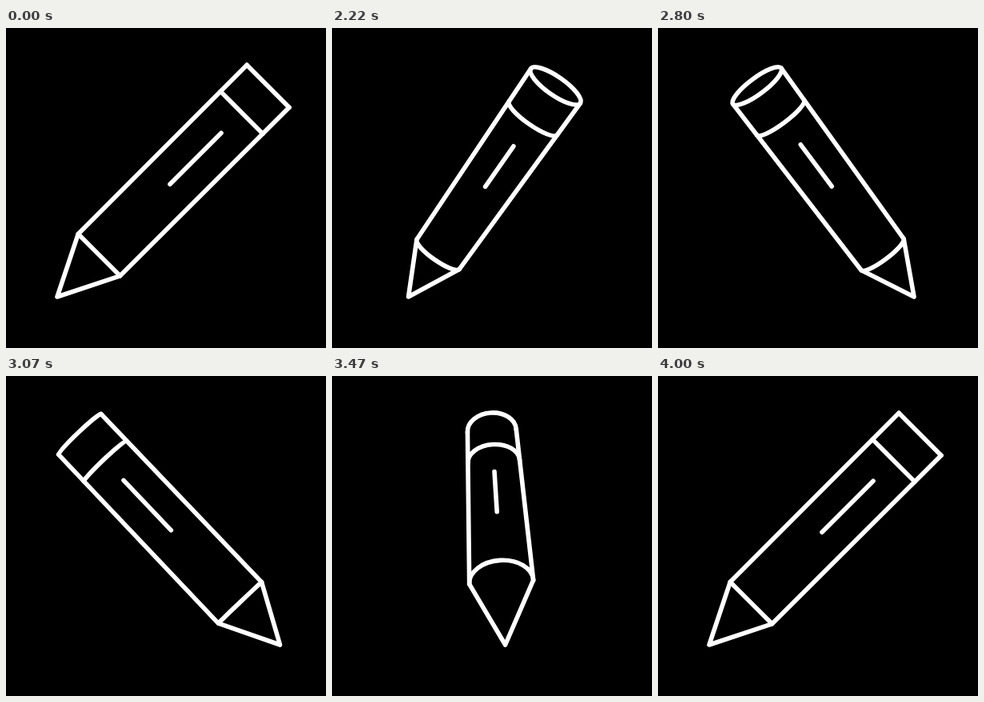
These frames come from a looping animation (400x400 px, 4020 ms). An HTML page with a canvas:

```html
<!DOCTYPE html>
<html>
<head>
<meta charset="utf-8">
<style>
html, body { margin: 0; width: 100%; height: 100%; overflow: hidden; background: #000; }
canvas { display: block; }
</style>
</head>
<body>
<canvas id="stage" width="400" height="400"></canvas>
<script>
const LOOP = 4020, REST = 2000, TURN = 2000;
const ctx = document.getElementById('stage').getContext('2d');

function draw(ms) {
  const moving = ms >= REST && ms < REST + TURN;
  const angle = moving ? (ms - REST) / TURN * 2 * Math.PI : 0;
  const cos = Math.cos(angle);
  const front = Math.sin(angle) >= 0; // eraser end faces the viewer
  const depth = Math.abs(Math.sin(angle)) ** 1.5;
  const late = depth ** 4;
  // value in the flat pose, plus its change when fully facing or turned away
  const mix = (flat, toward, away, amount = depth) => flat + (front ? toward : away) * amount;

  const tip = { x: 205 - cos * mix(141, 21, -14, late), y: 336 };
  const top = { x: 205 + cos * mix(122.5, -50, -66), y: mix(72.8, -5.2, -4.6, late) };
  const tilt = Math.atan2(top.y - tip.y, top.x - tip.x) + Math.PI / 2;
  const along = f => ({ x: tip.x + (top.x - tip.x) * f, y: tip.y + (top.y - tip.y) * f });

  const baseAt = mix(0.199, 0.01, 0.095, depth ** 2), bandAt = mix(0.875, -0.055, -0.02);
  const baseR = mix(37, -8.8, 3.1), topR = mix(37.4, 0.5, -7);
  const bandR = baseR + (topR - baseR) * (bandAt - baseAt) / (1 - baseAt);
  const ring = (at, r, toward, away) => ({ ...along(at), r, bulge: r * mix(0, toward, away) });
  const base = ring(baseAt, baseR, 0.48, 0.69 * depth);
  const band = ring(bandAt, bandR, 0.47, 0.67);
  const cap = ring(1, topR, 0.6, 0.74);

  const edge = (c, side) => [c.x + side * c.r * Math.cos(tilt), c.y + side * c.r * Math.sin(tilt)];
  const line = (...points) => {
    ctx.beginPath();
    points.forEach(p => ctx.lineTo(...p));
    ctx.stroke();
  };
  const arc = (c, whole) => {
    const start = front ? 0 : Math.PI;
    ctx.beginPath();
    ctx.ellipse(c.x, c.y, c.r, Math.max(c.bulge, 0.01), tilt, start, start + Math.PI * (whole ? 2 : 1));
    ctx.stroke();
  };

  ctx.fillStyle = '#000';
  ctx.fillRect(0, 0, 400, 400);
  ctx.strokeStyle = '#fff';
  ctx.lineWidth = 5.6;
  ctx.lineCap = ctx.lineJoin = 'round';

  line(edge(cap, -1), edge(base, -1), [tip.x, tip.y], edge(base, 1), edge(cap, 1));
  arc(base);
  arc(band);
  arc(cap, front);

  const from = along(mix(0.535, -0.025, 0.087)), to = along(mix(0.778, -0.125, 0.031));
  line([from.x, from.y], [to.x, to.y]);
}

const begin = performance.now();
function tick() {
  draw((performance.now() - begin) % LOOP);
  requestAnimationFrame(tick);
}
tick();
</script>
</body>
</html>
```
